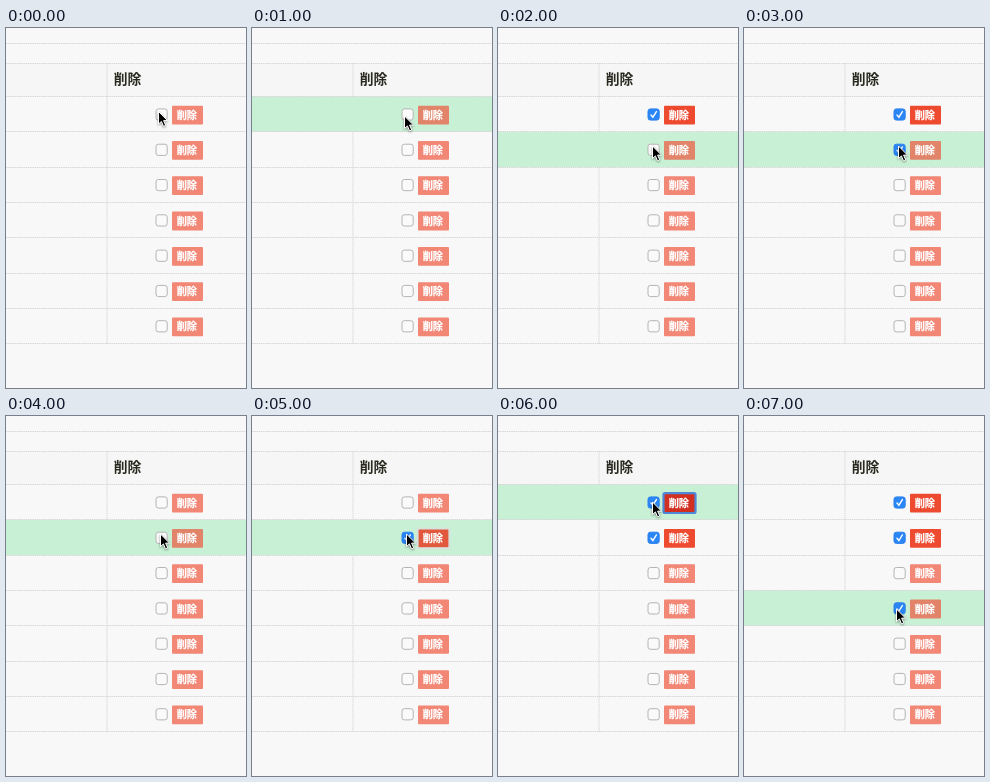
An HTML page for the animation above (8 s loop, 240 px wide and 360 px high).

```html
<!DOCTYPE html>
<html lang="ja">
<head>
<meta charset="utf-8">
<style>
  html, body { margin: 0; width: 100%; height: 100%; overflow: hidden; background: #f8f8f8; }
  svg { display: block; width: 240px; height: 360px; }
  text { font-family: "Noto Sans CJK JP", "Noto Sans CJK", sans-serif; font-weight: 700; }
  .rule { stroke: #d6d6d6; stroke-dasharray: 1.5 .7; fill: none; }
  .label { font-size: 10.2px; fill: #fff; stroke: #fff; stroke-width: .25; }
  .glow { fill: none; stroke-width: 2.2; filter: blur(.5px); }
  .cursor { filter: drop-shadow(.4px 1px .8px #0006); }
</style>
</head>
<body>
<svg id="stage" viewBox="0 0 240 360"></svg>
<script>
const ROWS = 7, TOP = 68.5, PITCH = 35.3, STEP = 1000;
const NS = 'http://www.w3.org/2000/svg';
const stage = document.getElementById('stage');

function add(parent, tag, attrs, text = '') {
  const el = document.createElementNS(NS, tag);
  for (const key in attrs) el.setAttribute(key, attrs[key]);
  el.textContent = text;
  parent.append(el);
  return el;
}
const rule = d => add(stage, 'path', { class: 'rule', d });
const rowTop = i => TOP + i * PITCH;

add(stage, 'rect', { y: 36, width: 240, height: 32, fill: '#f6f6f6' });
rule('M101 35V316');
const highlight = add(stage, 'rect', { width: 240, height: PITCH, fill: '#c8f0d4' });
for (const y of [15.5, 35.5]) rule(`M0 ${y}H240`);
for (let i = 0; i <= ROWS; i++) rule(`M0 ${Math.floor(rowTop(i)) + .5}H240`);
add(stage, 'text', { x: 107.8, y: 56, 'font-size': 13.8, fill: '#28281f' }, '削除');

const rows = Array.from({ length: ROWS }, (_, i) => {
  const g = add(stage, 'g', { transform: `translate(0 ${rowTop(i) + 18})` });
  const box = add(g, 'rect', { x: 150, y: -5.6, width: 11.2, height: 11.2, rx: 2.4 });
  const tick = add(g, 'path', {
    d: 'M153 .5l1.9 2.2 3.5-5.6', fill: 'none', stroke: '#fff',
    'stroke-width': 1.4, 'stroke-linecap': 'round'
  });
  const button = add(g, 'rect', { x: 166, y: -8.8, width: 31, height: 18.8, rx: 1 });
  const glow = add(g, 'rect', { class: 'glow', x: 165.5, y: -9.3, width: 32, height: 19.8, rx: 1.5 });
  add(g, 'text', { class: 'label', x: 170.7, y: 4.1 }, '削除');
  return { box, tick, glow, button };
});

const cursor = add(stage, 'path', {
  class: 'cursor', d: 'M0 0V12.6L2.9 9.9 5 14.8 7.2 13.9 5.1 9.1H9Z',
  fill: '#000', stroke: '#fff', 'stroke-width': 1, 'stroke-linejoin': 'round'
});

// One state per second: pointer tip, hovered row, ticked rows, button overrides
const states = [
  { at: [152.5, 83.5], hover: -1, ticked: [] },
  { at: [152.5, 88], hover: 0, ticked: [] },
  { at: [154.5, 118], hover: 1, ticked: [0] },
  { at: [154.5, 118], hover: 1, ticked: [0, 1], pale: 1 },
  { at: [154.5, 118], hover: 1, ticked: [] },
  { at: [154.5, 118], hover: 1, ticked: [1], focus: 1, ring: '#d5e3dc', fill: '#e2583c' },
  { at: [154.5, 86], hover: 0, ticked: [0, 1], focus: 0, ring: '#4f87d8', fill: '#d12f20' },
  { at: [152.5, 193], hover: 3, ticked: [0, 1, 3], pale: 3 }
];

function show(state) {
  highlight.setAttribute('y', rowTop(state.hover));
  highlight.setAttribute('visibility', state.hover < 0 ? 'hidden' : 'visible');
  cursor.setAttribute('transform', `translate(${state.at})`);
  rows.forEach(({ box, tick, glow, button }, i) => {
    const on = state.ticked.includes(i), focused = state.focus === i;
    box.setAttribute('fill', on ? '#2b86f5' : '#fafafa');
    box.setAttribute('stroke', on ? '#2b80ee' : '#b4b4b4');
    tick.setAttribute('visibility', on ? 'visible' : 'hidden');
    glow.setAttribute('stroke', focused ? state.ring : 'none');
    button.setAttribute('fill', focused ? state.fill : '#ee4a30');
    button.setAttribute('fill-opacity', on && state.pale !== i ? 1 : .65);
  });
}

function frame() {
  show(states[Math.floor(performance.now() / STEP) % states.length]);
  requestAnimationFrame(frame);
}
frame();
</script>
</body>
</html>
```
